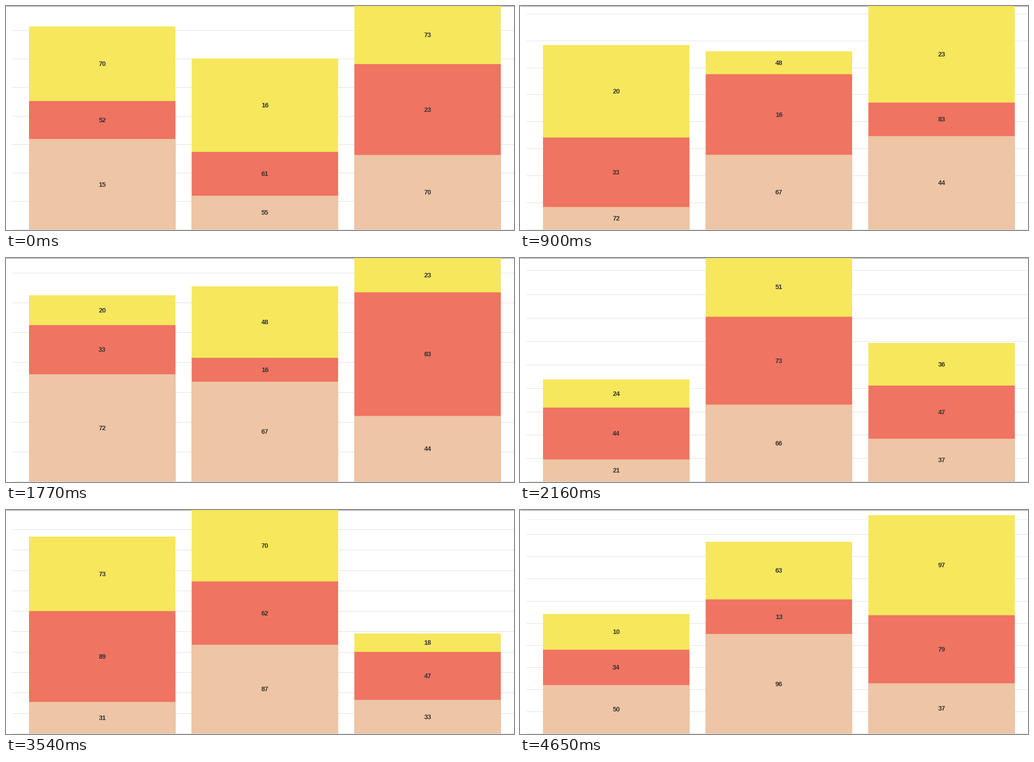
A matplotlib script that plays this animation: 1126 by 497 pixels, repeating every 4680 ms.

```python
import numpy as np
import matplotlib.pyplot as plt
from matplotlib.animation import FuncAnimation
from matplotlib.patches import Rectangle

W, H, DPI = 1126, 497, 100
PX = 72 / DPI                      # points per pixel
BASE = 496                         # baseline, also the plot height
STEP_MS, FRAMES = 30, 156
PERIOD, LEAD = 900, 20             # ms between data updates, head start

FILLS = ["#eec5a5", "#ef7462", "#f6e75c"]
BAR_W = 0.9 * 360.6                # nine tenths of a column
BAR_X = 51 + 360.6 * np.arange(3)
TICKS = np.arange(0, 201, 20)

# The labelled values at each update: three columns, segments bottom to top.
VALUES = np.array([
    [(65, 26, 52), (23, 30, 67), (52, 65, 40)],
    [(15, 52, 70), (55, 61, 16), (70, 23, 73)],
    [(72, 33, 20), (67, 16, 48), (44, 83, 23)],
    [(21, 44, 24), (66, 73, 51), (37, 47, 36)],
    [(31, 89, 73), (87, 62, 70), (33, 47, 18)],
    [(30, 28, 87), (78, 76, 27), (67, 21, 77)],
    [(50, 34, 10), (96, 13, 63), (37, 79, 97)],
])
TOTALS = VALUES.cumsum(axis=2)
PEAKS = TOTALS.max(axis=(1, 2))
TOPS = BASE - TOTALS * (BASE / PEAKS)[:, None, None]


def spring(ms, omega, zeta=0.74):
    """Step response of an underdamped spring."""
    x = omega * ms / 1000
    wd = np.sqrt(1 - zeta ** 2)
    return 1 - np.exp(-zeta * x) * (np.cos(wd * x) + zeta / wd * np.sin(wd * x))


def mix(a, b, p):
    return a + (b - a) * p


def tick_state(k):
    """Which ticks fit the scale, and where they lie; others wait at the top."""
    shown = TICKS <= PEAKS[k]
    return shown.astype(float), np.where(shown, BASE * (1 - TICKS / PEAKS[k]), 0)


plt.rcParams["font.family"] = "Liberation Sans"
fig = plt.figure(figsize=(W / DPI, H / DPI), dpi=DPI, facecolor="white")
ax = fig.add_axes([0, 0, 1, 1])
ax.set_xlim(0, W)
ax.set_ylim(H, 0)
ax.axis("off")

ax.plot([2, W], [1, 1], color="#c0c0c0", lw=2 * PX, zorder=1)
grid = [ax.plot([14, W], [0, 0], color="#dcdfdc", lw=PX, zorder=2,
                solid_capstyle="butt")[0] for _ in TICKS]

# Every bar reaches the baseline and lower segments overlap upper ones,
# so that no seams show between them.
bars, labels = [], []
for x in BAR_X:
    for seg, fill in enumerate(FILLS):
        bars.append(ax.add_patch(Rectangle(
            (x, 0), BAR_W, 1, fc=fill, lw=0, snap=False, zorder=6 - seg)))
        labels.append(ax.text(
            x + BAR_W / 2, 0, "", color="#333333", fontsize=14.5 * PX,
            fontweight="bold", ha="center", va="baseline", zorder=7))


def place_grid(k, p):
    (was, y0), (now, y1) = tick_state(k), tick_state(k + 1)
    alphas = np.clip(mix(was, now, p), 0, 1)
    for line, y, alpha in zip(grid, mix(y0, y1, p), alphas):
        line.set_ydata([y, y])
        line.set_alpha(alpha)
        line.set_visible(bool(alpha > 0.4))


def place_bars(k, p):
    tops = mix(TOPS[k], TOPS[k + 1], p)
    bottoms = np.insert(tops[:, :-1], 0, BASE, axis=1)
    middles = (tops + bottoms) / 2
    parts = zip(bars, labels, tops.flat, middles.flat, VALUES[k + 1].flat)
    for bar, label, top, middle, value in parts:
        bar.set_y(top)
        bar.set_height(BASE - top)
        label.set_y(middle + 5)
        label.set_text(str(value))


def update(n):
    t = (n * STEP_MS if n > 1 else 0) + LEAD
    k, tau = divmod(t, PERIOD)
    place_grid(k, spring(tau, 11.6))
    place_bars(k, spring(tau, 12.4))
    return grid + bars + labels


anim = FuncAnimation(fig, update, frames=FRAMES, interval=STEP_MS,
                     repeat=True, repeat_delay=0, blit=False)
plt.show()
```
